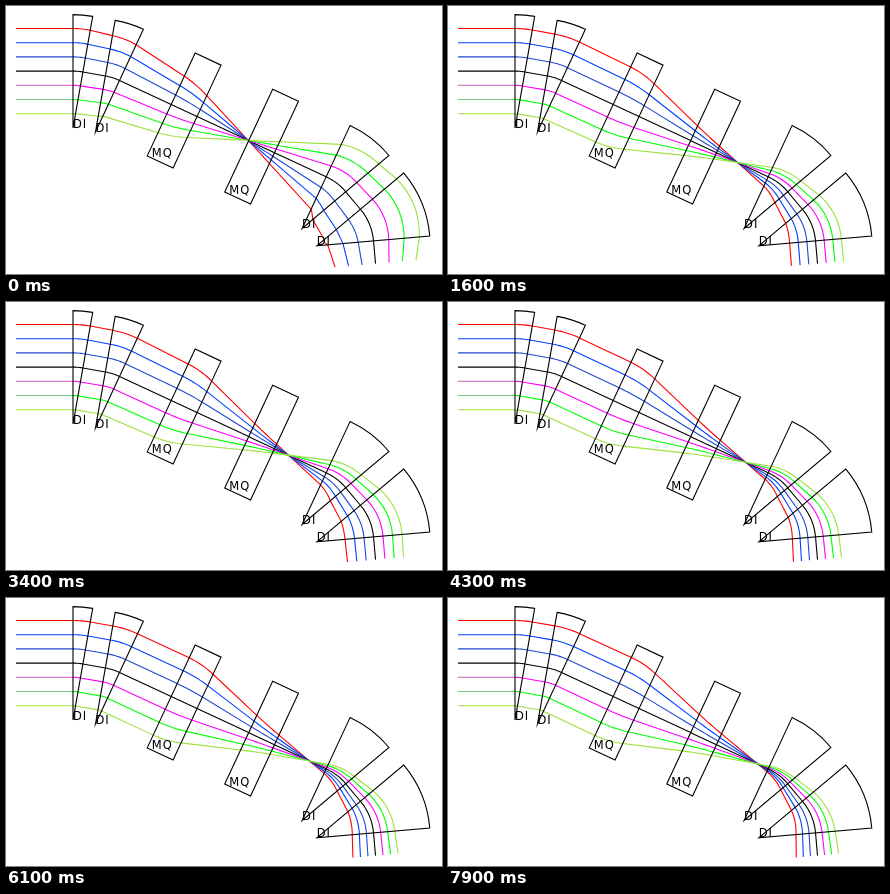
Recreate the animation shown at these times as an HTML page with a canvas. Size 436 by 268 pixels, loop 8 s.

```html
<!DOCTYPE html>
<html lang="en">
<head>
<meta charset="utf-8">
<title>Beam line</title>
<style>
html, body { margin: 0; width: 100%; height: 100%; overflow: hidden; background: #fff; }
canvas { display: block; }
</style>
</head>
<body>
<canvas id="stage" width="436" height="268"></canvas>
<script>
const ctx = document.getElementById('stage').getContext('2d');
const LOOP = 8000, STEP = 100;
const R = 57;          // bending radius, the unit of length
const GAP = 14.2;      // spacing of the incoming rays
const DEG = Math.PI / 180;

// Rays, top to bottom: colour in the magnets, colour in the first drift
const RAYS = [
  ['#ff0000'], ['#0040ff'], ['#2048d0'], ['#000000'],
  ['#ff00ff', '#c05aa8'], ['#00ff00', '#78c878'], ['#9be13c']
];

// Lattice: drift and quad lengths in R, dipole angles in degrees
const LINE = [
  ['drift', 1], ['bend', 10, 0], ['drift', 0.4], ['bend', 15, 0], ['drift', 1],
  ['quad', 0.5, 1], ['drift', 1], ['quad', 0.5, 2], ['drift', 1],
  ['bend', 25, 3], ['drift', 0.4], ['bend', 35, 3], ['drift', 0.4]
];

// Search for the focus: time, first dipoles, first quad, second quad
const KEYS = [
  [0, 0.46, 1.085, -0.16],
  [400, 0.55, 1.11, -0.11],
  [1000, 0.28, 1.03, -0.28],
  [1600, 0.05, 0.955, -0.422],
  [2100, 0.1, 0.97, -0.4],
  [2600, -0.25, 1.057, -0.98],
  [3000, 0.12, 0.98, -0.4],
  [3900, 0.05, 0.955, -0.422],
  [4300, 0.02, 0.93, -0.422],
  [4800, 0.04, 0.95, -0.42],
  [5400, -0.07, 0.92, -0.49],
  [6000, 0, 0.915, -0.425],
  [6800, -0.03, 0.902, -0.422],
  [7900, -0.02, 0.9, -0.43]
];

function strengths(t) {
  let i = 0;
  while (i < KEYS.length - 2 && t >= KEYS[i + 1][0]) i++;
  const a = KEYS[i], b = KEYS[i + 1];
  const p = Math.min(1, (t - a[0]) / (b[0] - a[0]));
  const e = (1 - Math.cos(Math.PI * p)) / 2;
  const mix = n => a[n] + (b[n] - a[n]) * e;
  return [mix(1), mix(2), mix(3), 0.8];
}

// Carry offset x and slope v through a field of strength k
function carry([x, v], k, len) {
  if (Math.abs(k) < 1e-6) return [x + v * len, v];
  const w = Math.sqrt(Math.abs(k)), f = w * len;
  const c = k > 0 ? Math.cos(f) : Math.cosh(f);
  const s = k > 0 ? Math.sin(f) : Math.sinh(f);
  return [x * c + v * s / w, v * c - k * x * s / w];
}

// Walk the central orbit once and keep its pieces
const pieces = [];
let px = 10, py = 65.1, ang = 0;
for (const [type, size, knob] of LINE) {
  const piece = { type, knob, x: px, y: py, ang };
  if (type === 'bend') {
    piece.len = size * DEG;
    piece.cx = px - R * Math.sin(ang);
    piece.cy = py + R * Math.cos(ang);
    ang += piece.len;
    px = piece.cx + R * Math.sin(ang);
    py = piece.cy - R * Math.cos(ang);
  } else {
    piece.len = size;
    px += R * size * Math.cos(ang);
    py += R * size * Math.sin(ang);
  }
  pieces.push(piece);
}

// Point on a piece: s along the orbit, d to its upper side
function place(p, s, d) {
  if (p.type === 'bend') {
    const a = p.ang + s;
    return [p.cx + (R + d) * Math.sin(a), p.cy - (R + d) * Math.cos(a)];
  }
  const c = Math.cos(p.ang), n = Math.sin(p.ang);
  return [p.x + s * R * c + d * n, p.y + s * R * n - d * c];
}

function polyline(points, color) {
  ctx.beginPath();
  points.forEach(q => ctx.lineTo(q[0], q[1]));
  ctx.strokeStyle = color;
  ctx.stroke();
}

function drawMagnet(p) {
  ctx.beginPath();
  ctx.strokeStyle = '#000';
  if (p.type === 'bend') {
    const a = p.ang - Math.PI / 2;
    ctx.moveTo(p.cx, p.cy);
    ctx.arc(p.cx, p.cy, R * 1.99, a, a + p.len);
    ctx.fillText('DI', p.cx, p.cy - 0.5);
  } else {
    const h = R * 0.995;
    const corners = [place(p, 0, h), place(p, p.len, h), place(p, p.len, -h), place(p, 0, -h)];
    corners.forEach(q => ctx.lineTo(q[0], q[1]));
    ctx.fillText('MQ', corners[3][0] + 4.5, corners[3][1] + 1.5);
  }
  ctx.closePath();
  ctx.stroke();
}

function drawRays(k) {
  let state = [1, 0];
  const path = [];
  for (const p of pieces) {
    const field = p.type === 'drift' ? 0 : k[p.knob];
    const n = p.type === 'drift' ? 1 : 8;
    for (let j = 0; j <= n; j++) {
      const s = p.len * j / n;
      path.push([p, s, carry(state, field, s)[0]]);
    }
    state = carry(state, field, p.len);
  }
  RAYS.forEach(([color, start], i) => {
    const points = path.map(([p, s, x]) => place(p, s, (3 - i) * GAP * x));
    polyline(points.slice(1), color);
    polyline(points.slice(0, 2), start || color);
  });
}

function draw(now) {
  const t = Math.floor((now % LOOP) / STEP) * STEP;
  ctx.fillStyle = '#fff';
  ctx.fillRect(0, 0, 436, 268);
  ctx.fillStyle = '#000';
  ctx.font = '11.5px "DejaVu Sans", sans-serif';
  ctx.letterSpacing = '1px';
  ctx.lineWidth = 1.1;
  drawRays(strengths(t));
  pieces.filter(p => p.type !== 'drift').forEach(drawMagnet);
  requestAnimationFrame(draw);
}
requestAnimationFrame(draw);
</script>
</body>
</html>
```
